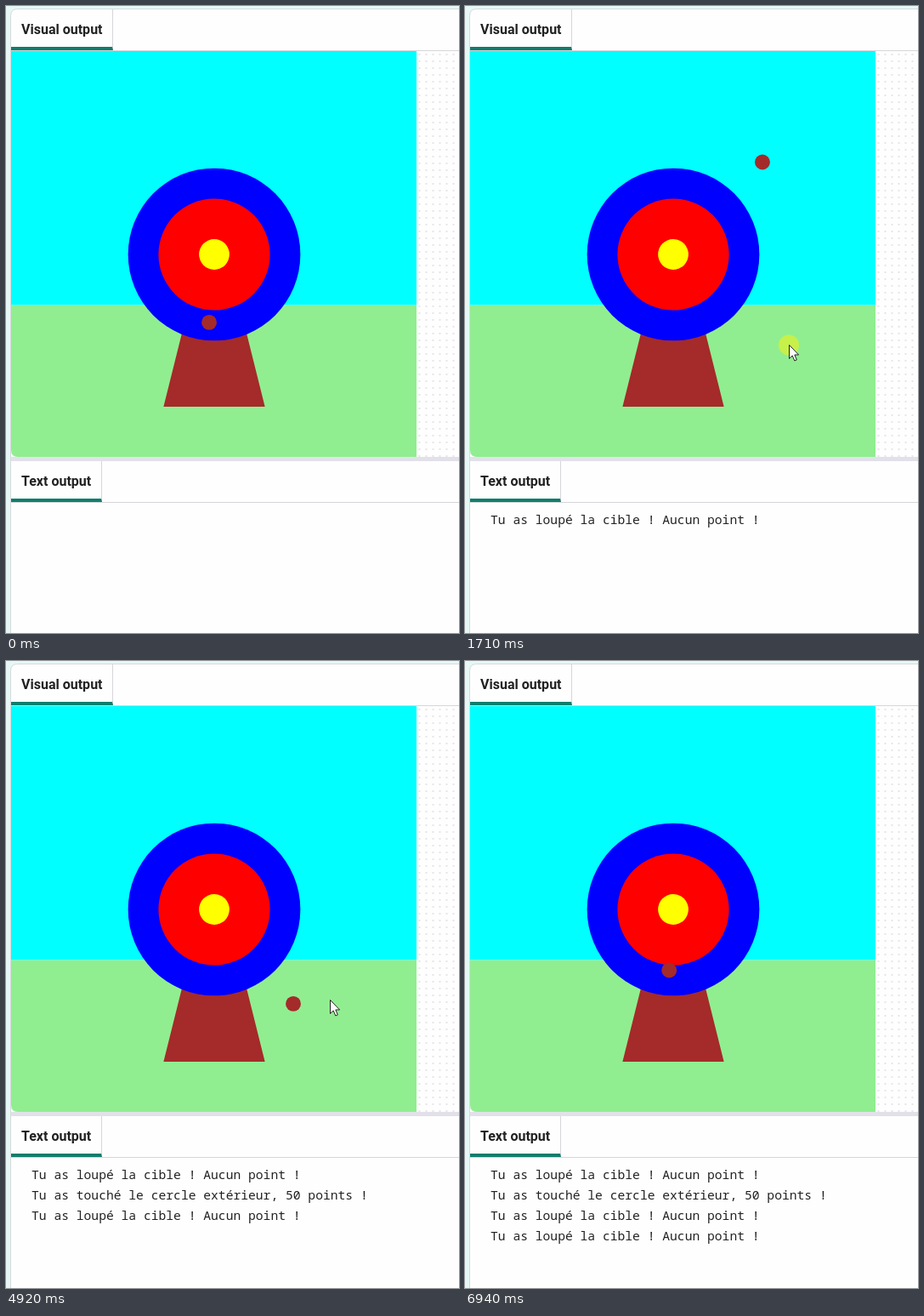
These frames come from a looping animation (533 by 737 pixels, 7080 ms). An HTML page:

```html
<!DOCTYPE html>
<html lang="fr">
<head>
<meta charset="utf-8">
<title>Tir sur cible</title>
<style>
  html, body { margin: 0; width: 100%; height: 100%; overflow: hidden; background: #e6f7f6; }
  svg { display: block; width: 533px; height: 737px; }
  .tab { font: 700 16px Roboto, sans-serif; fill: #212121; }
  .log { font: 14.67px "Noto Sans Mono", monospace; fill: #222; }
  .rule { fill: #d6d6da; }
  .mark { fill: #107d6d; }
</style>
</head>
<body>
<svg viewBox="0 0 533 737">
  <defs>
    <pattern id="dots" x="482.5" y="53" width="8" height="8" patternUnits="userSpaceOnUse">
      <circle cx="4" cy="4" r="1" fill="#dedee0"/>
    </pattern>
    <clipPath id="view"><path d="M6 53H483V530H14Q6 530 6 522Z"/></clipPath>
  </defs>

  <path d="M5.5 740V11.5Q5.5 3.5 13.5 3.5H540V740Z" fill="#fefefe" stroke="#d6d9dc"/>
  <rect x="483" y="53" width="50" height="477" fill="url(#dots)"/>

  <rect class="rule" x="6" y="52" width="527" height="1"/>
  <rect class="rule" x="125" y="4" width="1" height="48"/>
  <path class="mark" d="M6 48H125L126 52H6Z"/>
  <text class="tab" x="18" y="33">Visual output</text>

  <g clip-path="url(#view)">
    <g transform="translate(6.5 53.5) scale(1.1925)">
      <rect x="-1" y="-1" width="402" height="251" fill="#0ff"/>
      <rect x="-1" y="250" width="402" height="151" fill="#90ee90"/>
      <path d="M150 350L200 150L250 350Z" fill="#a52a2a"/>
      <circle cx="200" cy="200" r="85" fill="#00f"/>
      <circle cx="200" cy="200" r="55" fill="#f00"/>
      <circle cx="200" cy="200" r="15" fill="#ff0"/>
      <circle id="arrow" r="7.5" fill="#a52a2a"/>
    </g>
  </g>

  <rect x="6" y="530" width="527" height="5" fill="#e2e1ea"/>
  <rect class="rule" x="6" y="583" width="527" height="1"/>
  <rect class="rule" x="112" y="535" width="1" height="48"/>
  <path class="mark" d="M6 579H112L113 583H6Z"/>
  <text class="tab" x="18" y="564">Text output</text>

  <g id="logs"></g>
  <circle id="click" cx="381" cy="398.5" r="12" fill="#c7f04a"/>
  <path id="cursor" d="M.5 .5V16.5L4.2 13L6.8 19L9.3 17.9L6.8 12H11.6Z" fill="#fff" stroke="#222"/>
</svg>
<script>
  const LOOP = 7080, SHOT_MS = 496, SHOT_LEAD = 40, CLICK_MS = 70;
  const ENTER = 200, REST = 980, LEAVE = 5640, TOP = 6010, GONE = 6080;
  const get = id => document.getElementById(id);
  const arrow = get('arrow'), cursor = get('cursor'), click = get('click'), logs = get('logs');

  // Landing spots on the 400 x 400 canvas, one per shot
  const spots = '195,267 195,172 137,277 288,109 166,109 284,106 256,257 292,125 ' +
    '132,204 217,110 278,293 124,281 263,171 251,277 196,260';
  const shots = spots.split(' ').map(spot => spot.split(',').map(Number));
  const shotAt = t => shots[Math.floor((t + SHOT_LEAD) / SHOT_MS)];

  const clicks = [1710, 3170, 3840, 4990];

  // The message depends on how far the arrow is from the centre
  function verdict([x, y]) {
    const d = Math.hypot(x - 200, y - 200);
    if (d > 85) return 'Tu as loupé la cible ! Aucun point !';
    return 'Tu as touché le cercle extérieur, 50 points !';
  }

  const lines = clicks.map((ms, i) => {
    const line = document.createElementNS('http://www.w3.org/2000/svg', 'text');
    line.setAttribute('class', 'log');
    line.setAttribute('x', 30);
    line.setAttribute('y', 609 + 24 * i);
    line.textContent = verdict(shotAt(ms));
    return logs.appendChild(line);
  });

  const span = (t, from, to) => Math.min(1, Math.max(0, (t - from) / (to - from)));
  const easeOut = (u, power) => 1 - (1 - u) ** power;
  const show = (el, on) => { el.style.visibility = on ? 'visible' : 'hidden'; };

  // Glides in from the upper right, rests, then leaves through the top
  function pointerAt(t) {
    const come = span(t, ENTER, REST), go = span(t, LEAVE, TOP);
    return [
      419 - 38 * easeOut(come, 1.4) + 5 * Math.sin(Math.PI * go),
      172 + 226 * easeOut(come, 3.4) - 382 * go ** 2
    ].map(Math.round);
  }

  function draw(t) {
    const [x, y] = shotAt(t);
    arrow.setAttribute('cx', x);
    arrow.setAttribute('cy', y);

    cursor.setAttribute('transform', `translate(${pointerAt(t)})`);
    show(cursor, t >= ENTER && t < GONE);
    show(click, clicks.some(ms => t >= ms && t < ms + CLICK_MS));
    lines.forEach((line, i) => show(line, t >= clicks[i]));
  }

  const start = performance.now();
  function tick() {
    draw((performance.now() - start) % LOOP);
    requestAnimationFrame(tick);
  }
  tick();
</script>
</body>
</html>
```
